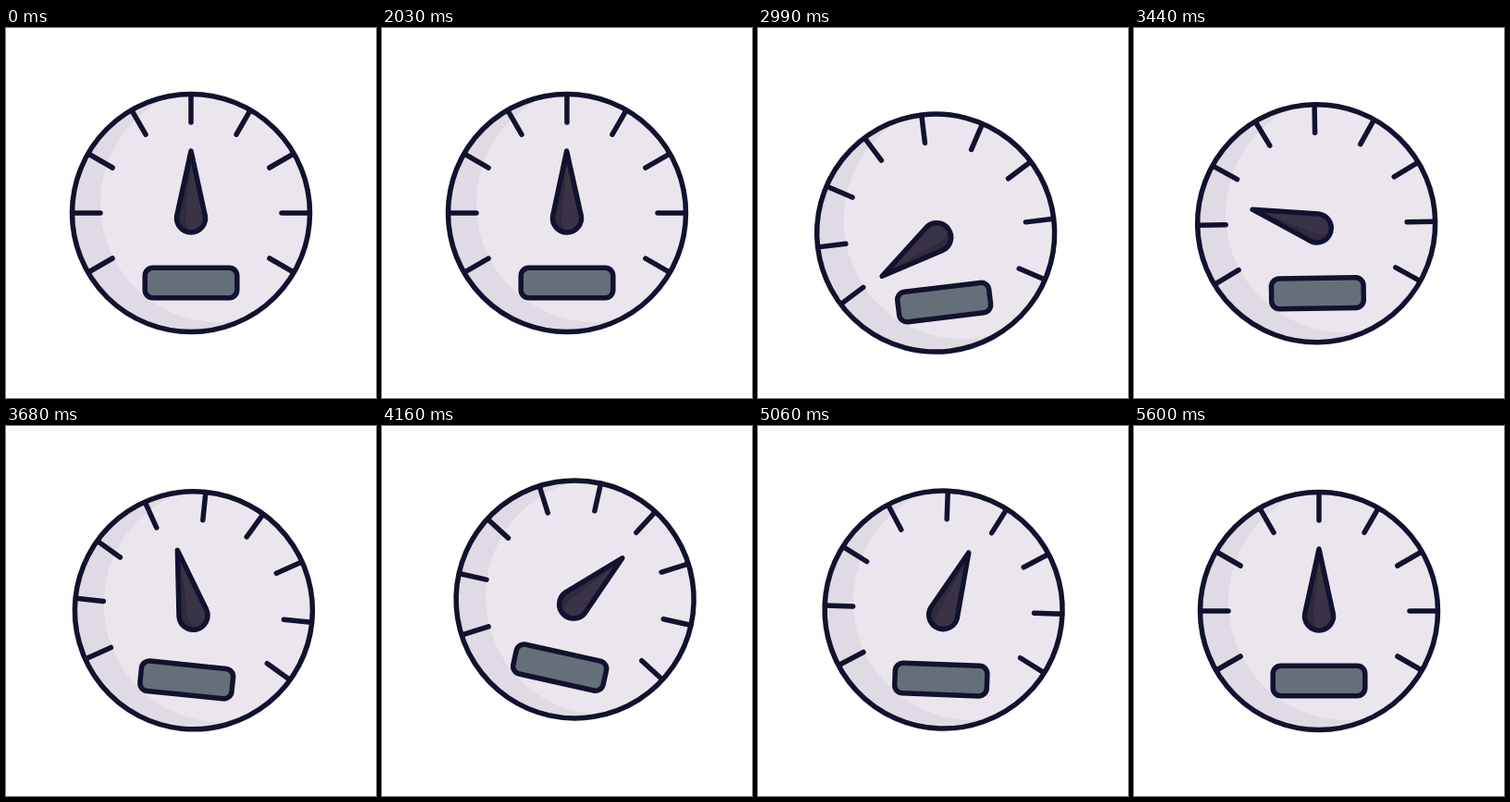
Write an HTML page that moves like this. It is 400 px wide and 400 px high and loops after 5.66 s.

```html
<!DOCTYPE html>
<html lang="en">
<head>
<meta charset="utf-8">
<title>Gauge</title>
<style>
  html, body { margin: 0; width: 100%; height: 100%; overflow: hidden; background: #fff; }
  svg { display: block; width: 100%; height: 100%; }
  .line { stroke: #12122f; stroke-width: 5.5; stroke-linecap: round; stroke-linejoin: round; }
</style>
</head>
<body>
<svg viewBox="0 0 400 400">
  <clipPath id="face"><circle cx="200" cy="200" r="128.5"/></clipPath>
  <g id="dial">
    <circle cx="200" cy="200" r="128.5" fill="#e0dae4"/>
    <circle cx="230" cy="190" r="128" fill="#ebe6ee" clip-path="url(#face)"/>
    <circle class="line" cx="200" cy="200" r="128.5" fill="none"/>
    <g id="ticks" class="line"></g>
    <rect class="line" x="150.2" y="259.2" width="99.6" height="32.6" rx="8.5" fill="#656f7a"/>
    <g id="needle">
      <path d="M200 133L215.3 203A15.5 15.5 0 1 1 184.7 203Z" fill="#3a3347"/>
      <path d="M200 133V150L194 203Q193 213 199 220A15.5 15.5 0 0 1 184.7 203Z" fill="#2f2a3c"/>
      <path class="line" d="M200 133L215.3 203A15.5 15.5 0 1 1 184.7 203Z" fill="none"/>
    </g>
  </g>
</svg>
<script>
const LOOP = 5660, START = 2030, END = 5600, STEP = 30;
const dial = document.getElementById('dial');
const needle = document.getElementById('needle');

let ticks = '';
for (let a = -120; a <= 120; a += 30) {
  ticks += `<line x1="200" y1="72" x2="200" y2="102" transform="rotate(${a} 200 200)"/>`;
}
document.getElementById('ticks').innerHTML = ticks;

// Cubic bezier ease with handles (x1, 0) and (x2, 1).
const bezier = (x1, x2) => x => {
  let lo = 0, hi = 1;
  for (let i = 0; i < 24; i++) {
    const s = (lo + hi) / 2, r = 1 - s;
    if (3 * s * r * (r * x1 + s * x2) + s * s * s < x) lo = s; else hi = s;
  }
  return lo * lo * (3 - 2 * lo);
};
const smooth = bezier(.33, .4), snap = bezier(.5, .5), settle = bezier(.2, .25);

// The dial leans to one side, then the other, overshoots and comes to rest.
const rest = { x: 0, y: 0, turn: 0, swing: 0 };
const moves = [
  { from: 2000, to: 3150, ease: smooth, pose: { x: -8, y: 22, turn: -7, swing: -121 } },
  { from: 3150, to: 4650, ease: settle, pose: { x: 10, y: -15.5, turn: 14.2, swing: 47 } },
  { from: 4710, to: 5275, ease: snap, pose: { x: -3, y: 4, turn: -2.5, swing: 10 } },
  { from: 5275, to: 5600, ease: settle, pose: rest }
];

function poseAt(t) {
  const pose = { ...rest };
  for (const move of moves) {
    if (t <= move.from) break;
    const k = move.ease(Math.min(1, (t - move.from) / (move.to - move.from)));
    for (const key in pose) pose[key] += (move.pose[key] - pose[key]) * k;
  }
  return pose;
}

function draw(now) {
  const time = now % LOOP;
  const t = time < START ? 0 : Math.min(END, time - (time - START) % STEP);
  const { x, y, turn, swing } = poseAt(t);
  dial.setAttribute('transform', `translate(${x} ${y}) rotate(${turn} 200 200)`);
  needle.setAttribute('transform', `rotate(${swing} 200 205)`);
}

const begin = performance.now();
(function frame() {
  draw(performance.now() - begin);
  requestAnimationFrame(frame);
})();
</script>
</body>
</html>
```
